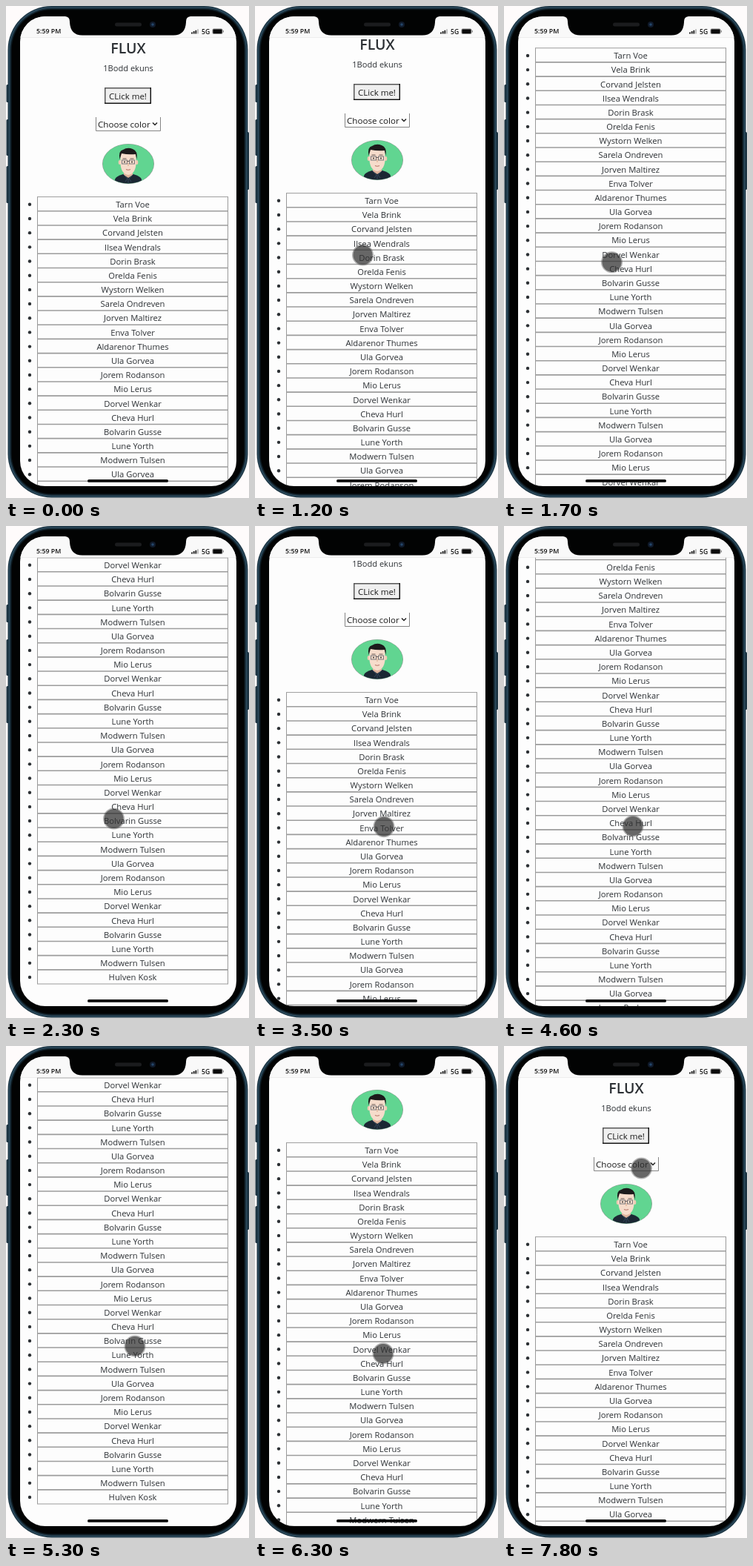
Animation, 328 px wide and 664 px high, one loop 8000 ms. Source, as an HTML page with a canvas:

```html
<!DOCTYPE html>
<html lang="en">
<head>
<meta charset="utf-8">
<title>Phone list scroll</title>
<style>
  html, body { margin: 0; width: 100%; height: 100%; overflow: hidden; background: #fefbfb; }
  canvas { display: block; }
</style>
</head>
<body>
<canvas id="stage" width="328" height="664"></canvas>
<script>
const ctx = document.getElementById('stage').getContext('2d');
const FONT = '"Open Sans", "Noto Sans", sans-serif';
const INK = '#2c3034';
const LOOP = 8000, STEP = 100, ROW = 19.18, LIST_TOP = 257.6, MAX_SCROLL = 483.5;

const first = ['Tarn Voe', 'Vela Brink', 'Corvand Jelsten', 'Ilsea Wendrals', 'Dorin Brask',
  'Orelda Fenis', 'Wystorn Welken', 'Sarela Ondreven', 'Jorven Maltirez', 'Enva Tolver',
  'Aldarenor Thumes'];
const repeated = ['Ula Gorvea', 'Jorem Rodanson', 'Mio Lerus', 'Dorvel Wenkar', 'Cheva Hurl',
  'Bolvarin Gusse', 'Lune Yorth', 'Modwern Tulsen'];
const people = [...first, ...repeated, ...repeated, ...repeated, ...repeated, 'Hulven Kosk'];

// Keys are [time, value, ...]; values move linearly in between.
const scrollKeys = [[1100, 0], [1200, 5], [1500, 90], [2200, 478], [2300, MAX_SCROLL],
  [2900, MAX_SCROLL], [3200, 110], [3300, 110], [3500, 33], [3700, 0], [3900, 0],
  [4600, 308], [4900, MAX_SCROLL], [5900, MAX_SCROLL], [6300, 127], [6400, 80],
  [6600, 80], [6700, 40], [6900, 40], [7100, 0]];
const cursorKeys = [[700, 170, 270], [1100, 145.5, 336], [1600, 145.5, 336], [2200, 145.5, 395],
  [2500, 145.5, 395], [3200, 174, 406], [4600, 174, 405], [5700, 174, 405], [6000, 173, 415],
  [6900, 173, 415], [7700, 185.5, 165]];

function track(keys, t) {
  const next = keys.findIndex(key => key[0] > t);
  if (next === 0) return keys[0].slice(1);
  if (next < 0) return keys[keys.length - 1].slice(1);
  const a = keys[next - 1], b = keys[next], p = (t - a[0]) / (b[0] - a[0]);
  return a.slice(1).map((v, i) => v + (b[i + 1] - v) * p);
}

function rect(x, y, w, h, color, radius = 0) {
  ctx.fillStyle = color;
  ctx.beginPath();
  ctx.roundRect(x, y, w, h, radius);
  ctx.fill();
}

function oval(x, y, rx, ry, color) {
  ctx.fillStyle = color;
  ctx.beginPath();
  ctx.ellipse(x, y, rx, ry, 0, 0, Math.PI * 2);
  ctx.fill();
}

function shape(path, color) {
  ctx.fillStyle = color;
  ctx.fill(new Path2D(path));
}

function line(path, color, width) {
  ctx.strokeStyle = color;
  ctx.lineWidth = width;
  ctx.stroke(new Path2D(path));
}

function text(str, x, y, size, weight = 400, align = 'center', color = INK) {
  ctx.font = `${weight} ${size}px ${FONT}`;
  ctx.textAlign = align;
  ctx.fillStyle = color;
  ctx.fillText(str, x, y);
}

function drawBody() {
  rect(0, 0, 328, 664, '#fefbfb');
  for (const [y, h] of [[106, 24], [153, 49], [216, 50]]) rect(0.5, y, 5, h, '#1c3442', 1.5);
  rect(322, 170, 6, 78, '#1c3442', 1.5);
  const layers = [[0, '#1b3341'], [1.2, '#2d4c5f'], [2.6, '#1a303d'], [4, '#0a141a'], [5.2, '#020303']];
  for (const [inset, color] of layers) {
    rect(2.5 + inset, inset, 324 - 2 * inset, 663.5 - 2 * inset, color, 59 - inset);
  }
}

function drawAvatar() {
  oval(165, 213, 35, 27, '#8d9a92');
  oval(165, 213, 34.4, 26.4, '#61d591');
  ctx.save();
  ctx.beginPath();
  ctx.ellipse(165, 213, 34.4, 26.4, 0, 0, Math.PI * 2);
  ctx.clip();
  shape('M147 241V234Q148 230 158 227H172Q182 230 183 234V241Z', '#1b2733');
  shape('M159 220H171V228L165 232L159 228Z', '#dfb49c');
  line('M158 227L164 233L161 237M172 227L166 233L169 237M165 233V240', '#34465a', 1);
  oval(153.5, 211, 1.8, 3, '#efcab4');
  oval(176.5, 211, 1.8, 3, '#efcab4');
  shape('M154.5 198H175.5V214Q174 227 165 228Q156 227 154.5 214Z', '#f6dccb');
  shape('M153.5 207Q151.5 195 158 194Q164 190 171 193Q178 195 176.5 207L174.8 200Q165 201 156 199Z', '#1c1a1b');
  ctx.strokeStyle = '#77767a';
  ctx.lineWidth = 1;
  ctx.strokeRect(156.5, 208, 7, 5);
  ctx.strokeRect(166.5, 208, 7, 5);
  line('M163.5 209.5H166.5M157.5 206H162.5M167.5 206H172.5', '#5a4a46', 0.9);
  oval(160, 210.5, 0.9, 0.9, '#222');
  oval(170, 210.5, 0.9, 0.9, '#222');
  line('M165 212V216', '#e2b59c', 1.4);
  line('M162 220.5Q165 222 168 220.5', '#b9776a', 1.1);
  ctx.restore();
}

function drawPage() {
  text('FLUX', 165, 64, 19.5, 600);
  text('1Bodd ekuns', 165, 88, 11.1);

  rect(133, 110, 63, 22, '#0c0c0c');
  rect(133, 110, 61.5, 20.5, '#565656');
  rect(134.5, 111.5, 60, 19, '#efefef');
  text('CLick me!', 164.5, 126, 11.5, 400, 'center', '#1a1a1a');

  line('M121.5 150V168.5H208.5V150', '#858585', 1);
  text('Choose color', 124, 164, 11.6, 400, 'left', '#1a1a1a');
  line('M198 157.5L201 160.5L204 157.5', '#222', 1.5);

  drawAvatar();

  const bottom = LIST_TOP + people.length * ROW;
  line(`M42.5 ${LIST_TOP}V${bottom}M299.5 ${LIST_TOP}V${bottom}`, '#9a9a9a', 1);
  people.forEach((name, i) => {
    const y = LIST_TOP + i * ROW;
    line(`M42 ${y}H300`, '#9c9c9c', i ? 1.6 : 1);
    oval(32, y + 10.2, 2.2, 2.2, INK);
    text(name, 171, y + 14.4, 11.25);
  });
  line(`M42 ${bottom}H300`, '#9a9a9a', 1);
}

function drawStatusBar() {
  rect(19, 14, 292, 28, '#f9f9f9');
  rect(19, 42, 292, 0.8, '#e8e8e8');
  text('5:59 PM', 41, 37, 8.8, 600, 'left', '#111');
  for (let i = 0; i < 4; i++) {
    rect(250 + i * 2.7, 35.5 - i * 1.4, 1.9, 2 + i * 1.4, i < 3 ? '#222' : '#bbb');
  }
  text('5G', 264, 37.5, 8.6, 600, 'left', '#111');
  rect(278.5, 30.5, 14, 7.5, '#888', 2);
  rect(279.5, 31.5, 12, 5.5, '#0b0b0b', 1.2);
  rect(293, 33, 1, 2.5, '#888');
}

function drawNotch() {
  shape('M80 13H249V14Q243 14.5 243 21V22Q242 39.5 226 39.5H103Q87 39.5 86 22V21Q86 14.5 80 14Z', '#020303');
  rect(147, 22.5, 36, 5, '#1b1c1e', 2.5);
  oval(198, 25, 4, 4, '#101a2a');
  oval(198, 25, 1.8, 1.8, '#24466a');
}

function drawCursor(t) {
  if (t < cursorKeys[0][0]) return;
  const [x, y] = track(cursorKeys, t);
  oval(x, y, 14.5, 14.5, 'rgba(70,70,70,.4)');
  oval(x, y, 13, 13, 'rgba(40,40,40,.55)');
}

function draw(t) {
  const [scroll] = track(scrollKeys, t);
  drawBody();
  ctx.save();
  ctx.beginPath();
  ctx.roundRect(19, 14, 292, 634, 34);
  ctx.clip();
  rect(19, 14, 292, 634, '#fdfdfd');
  ctx.save();
  ctx.translate(0, -scroll);
  drawPage();
  ctx.restore();
  drawStatusBar();
  drawCursor(t);
  rect(110, 639, 109, 3.8, '#050505', 1.9);
  ctx.restore();
  drawNotch();
}

function frame(now) {
  draw(Math.floor((now % LOOP) / STEP) * STEP);
  requestAnimationFrame(frame);
}
requestAnimationFrame(frame);
</script>
</body>
</html>
```
